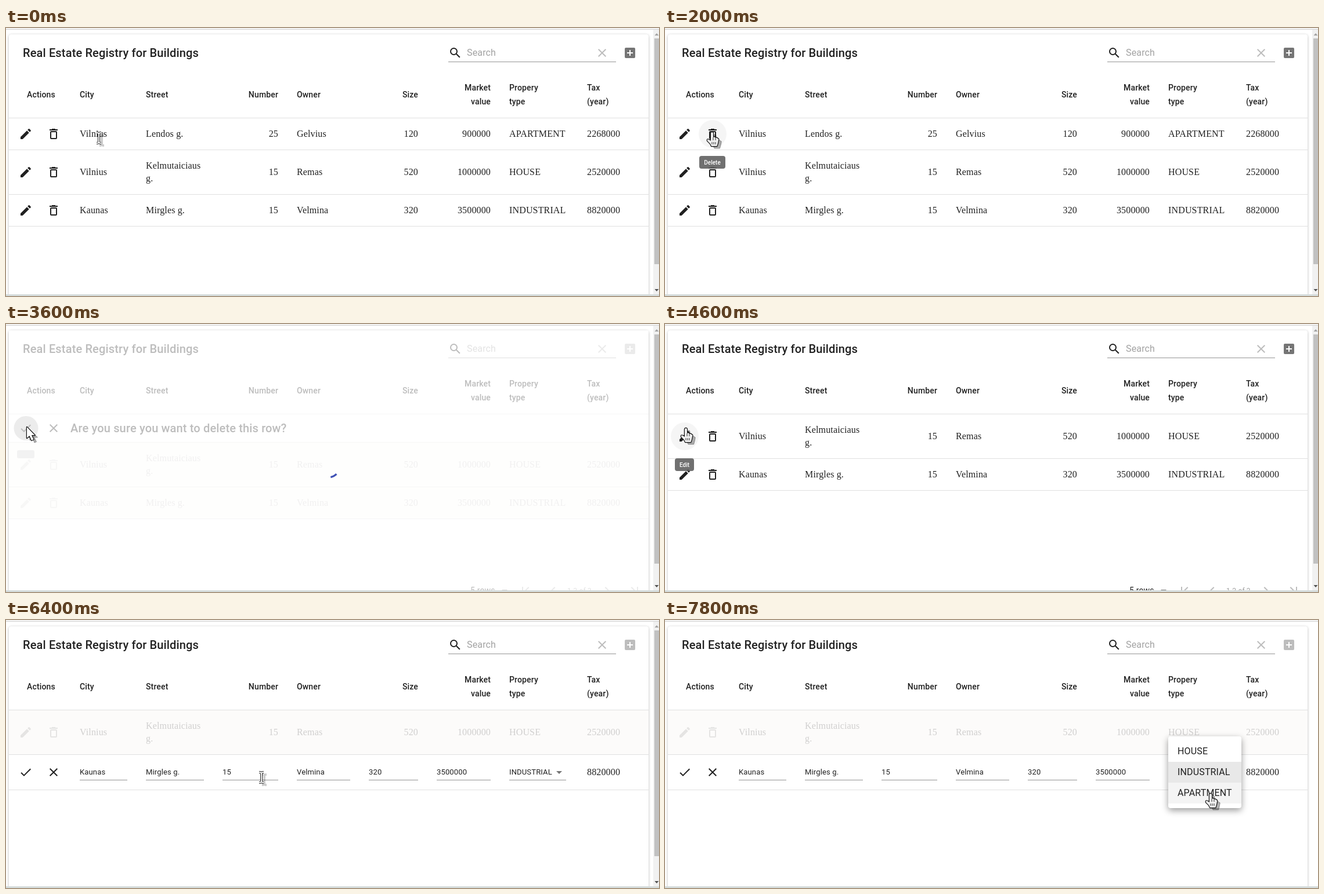
Animation of 1125 by 463 pixels, one loop 8 s. Source, as an HTML page with a canvas:

```html
<!DOCTYPE html>
<html lang="en">
<head>
<meta charset="utf-8">
<title>Building registry</title>
<style>
html, body { margin: 0; width: 100%; height: 100%; overflow: hidden; background: #fff; }
canvas { display: block; }
</style>
</head>
<body>
<canvas id="stage" width="1125" height="463"></canvas>
<script>
const ctx = document.getElementById('stage').getContext('2d');
const LOOP = 8000, TICK = 200;
const INK = '#212121', LINE = '#e0e0e0', MUTED = '#757575', OFF = '#bdbdbd';
const COLS = [127, 241, 469, 501, 710, 835, 867, 1001];
const RIGHT = [2, 4, 5];
const ROWS = [
  ['Vilnius', 'Lendos g.', '25', 'Gelvius', '120', '900000', 'APARTMENT', '2268000'],
  ['Vilnius', 'Kelmutaiciaus|g.', '15', 'Remas', '520', '1000000', 'HOUSE', '2520000'],
  ['Kaunas', 'Mirgles g.', '15', 'Velmina', '320', '3500000', 'INDUSTRIAL', '8820000']
];
const HEADS = ['City', 'Street', 'Number', 'Owner', 'Size', 'Market|value', 'Propery|type', 'Tax|(year)'];
const FIELDS = [[127, 209], [241, 341], [373, 469], [501, 593], [625, 710], [742, 835], [867, 965]];

// time, scene, pointer, x, y, hovered button x and y, tooltip
const STEPS = [
  [0, 'three', 'beam', 160, 190],
  [800, 'three', 'beam', 136, 214],
  [1000, 'three', 'hand', 92, 242, 82, 249],
  [1200, 'three', 'hand', 82, 250, 82, 249, 'Delete'],
  [1800, 'three', 'hand', 82, 188, 82, 183],
  [2000, 'three', 'hand', 81, 180, 82, 183, 'Delete'],
  [2400, 'confirm', 'hand', 81, 180, 82, 180],
  [2600, 'confirm', 'beam', 156, 187, 82, 180, 'Cancel'],
  [2800, 'confirm', 'beam', 130, 188],
  [3000, 'confirm', 'hand', 76, 184, 82, 180],
  [3200, 'confirm', 'hand', 40, 180, 34, 180],
  [3400, 'confirm', 'hand', 36, 178, 34, 180, 'Save'],
  [3600, 'busy', 'arrow', 36, 178],
  [4400, 'two', 'hand', 36, 180, 34, 194],
  [4600, 'two', 'hand', 36, 180, 34, 194, 'Edit'],
  [4800, 'two', 'hand', 50, 206, 34, 194],
  [5000, 'two', 'hand', 42, 244, 34, 260],
  [5200, 'two', 'hand', 35, 260, 34, 260, 'Edit'],
  [6000, 'edit', 'hand', 35, 260, 34, 263],
  [6200, 'edit', 'beam', 150, 270],
  [6400, 'edit', 'beam', 440, 272],
  [6600, 'edit', 'beam', 760, 268],
  [6800, 'edit', 'hand', 938, 260],
  [7000, 'open', 'hand', 938, 260],
  [7200, 'menu', 'hand', 938, 260],
  [7400, 'menu', 'hand', 939, 266],
  [7600, 'menu', 'hand', 940, 286],
  [7800, 'menu', 'hand', 940, 300]
];

const POINTERS = {
  hand: new Path2D('M-2 10V2Q-2 0 0 0T2 2V9Q5 7 6 10Q9 9 9.500 11Q12 11 11 14L10 19L8.500 24H-1L-3 20L-8 15Q-9 11 -5 13L-2 15Z'),
  arrow: new Path2D('M0 0V19L4.500 15L8 23L11.500 21.500L8 14H13.500Z'),
  beam: new Path2D('M-4 -9Q0 -9 0 -7V7Q0 9 -4 9M4 -9Q0 -9 0 -7M4 9Q0 9 0 7')
};
const PENCIL = new Path2D('M3 17.250V21H6.750L17.810 9.940L14.060 6.190ZM15.130 5.120L18.880 8.870L20.710 7.040Q21.300 6.300 20.710 5.630L18.370 3.290Q17.600 2.700 16.960 3.290Z');

const roboto = (size, weight = 400) => `${weight} ${size}px Roboto, sans-serif`;
const SERIF = '16px "Liberation Serif", serif';

function text(s, x, y, font, color = INK, align = 'left', spacing = 0.15) {
  ctx.font = font;
  ctx.fillStyle = color;
  ctx.textAlign = align;
  ctx.letterSpacing = spacing + 'px';
  ctx.fillText(s, x, y);
}

function rect(x, y, w, h, color, radius = 0) {
  ctx.fillStyle = color;
  ctx.beginPath();
  ctx.roundRect(x, y, w, h, radius);
  ctx.fill();
}

function disc(x, y, r, color) {
  ctx.fillStyle = color;
  ctx.beginPath();
  ctx.arc(x, y, r, 0, Math.PI * 2);
  ctx.fill();
}

function raised(x, y, w, h, blur, drop, alpha) {
  ctx.save();
  ctx.shadowColor = `rgba(0,0,0,${alpha})`;
  ctx.shadowBlur = blur;
  ctx.shadowOffsetY = drop;
  rect(x, y, w, h, '#fff', 4);
  ctx.restore();
}

function stroke(width, ...lines) {
  ctx.lineWidth = width;
  ctx.beginPath();
  for (const [x, y, ...rest] of lines) {
    ctx.moveTo(x, y);
    for (let i = 0; i < rest.length; i += 2) ctx.lineTo(rest[i], rest[i + 1]);
  }
  ctx.stroke();
}

const ICONS = {
  pencil() { ctx.fill(PENCIL); },
  trash() {
    ctx.fillRect(5, 4, 14, 2);
    ctx.fillRect(9, 3, 6, 1);
    ctx.lineWidth = 2;
    ctx.beginPath();
    ctx.roundRect(7, 8, 10, 12, 1);
    ctx.stroke();
  },
  check() { stroke(2, [4.1, 12.7, 9, 17.6, 20.3, 6.3]); },
  cross() { stroke(2, [5.7, 5.7, 18.3, 18.3], [18.3, 5.7, 5.7, 18.3]); },
  search() {
    ctx.lineWidth = 2;
    ctx.beginPath();
    ctx.arc(9.5, 9.5, 5.5, 0, Math.PI * 2);
    ctx.stroke();
    stroke(2.1, [13.8, 13.8, 19.8, 19.8]);
  },
  add() {
    ctx.beginPath();
    ctx.roundRect(3, 3, 18, 18, 2);
    ctx.fill();
    ctx.strokeStyle = '#fff';
    stroke(2, [12, 7, 12, 17], [7, 12, 17, 12]);
  },
  back() { stroke(2, [14.7, 6.7, 9.4, 12, 14.7, 17.3]); },
  first() { stroke(2, [7, 6, 7, 18], [17.7, 6.7, 12.4, 12, 17.7, 17.3]); }
};

function icon(name, x, y, color = INK, mirrored = false) {
  ctx.save();
  ctx.translate(x, y);
  if (mirrored) ctx.scale(-1, 1);
  ctx.translate(-12, -12);
  ctx.fillStyle = ctx.strokeStyle = color;
  ICONS[name]();
  ctx.restore();
}

function triangle(x, y, w, h, color) {
  ctx.fillStyle = color;
  ctx.beginPath();
  ctx.moveTo(x - w / 2, y);
  ctx.lineTo(x + w / 2, y);
  ctx.lineTo(x, y + h);
  ctx.fill();
}

const rule = y => rect(5, y, 1102, 1, LINE);

function cells(values, y, font, drop, gap) {
  values.forEach((value, i) => {
    const lines = value.split('|');
    lines.forEach((s, n) => text(s, COLS[i], y + drop + (n - (lines.length - 1) / 2) * gap,
      font, INK, RIGHT.includes(i) ? 'right' : 'left'));
  });
}

function row(index, top, height, y, disabled) {
  if (disabled) rect(5, top, 1102, height, '#fcfbfa');
  ctx.globalAlpha = disabled ? 0.1 : 1;
  icon('pencil', 34, y);
  icon('trash', 82, y);
  ctx.globalAlpha = disabled ? 0.2 : 1;
  cells(ROWS[index], y, SERIF, 5, 22);
  ctx.globalAlpha = 1;
  rule(top + height);
}

function header(disabled) {
  text('Real Estate Registry for Buildings', 29, 50, roboto(20, 500));
  icon('search', 774, 43);
  text('Search', 794, 48, roboto(16), '#a2a2a2');
  icon('cross', 1027, 43, OFF);
  rect(762, 58, 289, 1, '#949494');
  icon('add', 1075, 43, disabled ? OFF : MUTED);
  text('Actions', 36, 120, roboto(14, 500));
  cells(HEADS, 115, roboto(14, 500), 5, 24);
  rule(155);
}

function editRow(focused) {
  icon('check', 34, 263);
  icon('cross', 82, 263);
  FIELDS.forEach(([left, right], i) => {
    const active = focused && i === 6;
    text(ROWS[2][i], left, 267, roboto(13));
    rect(left, active ? 275 : 276, right - left, active ? 2 : 1, active ? INK : '#949494');
  });
  triangle(953, focused ? 265 : 261, 10, focused ? -5 : 5, MUTED);
  text(ROWS[2][7], 1001, 268, SERIF);
  rule(293);
}

function footer(count) {
  text('5 rows', 800, 465, roboto(14));
  triangle(859, 459, 10, 5, MUTED);
  icon('first', 895, 460, OFF);
  icon('back', 943, 460, OFF);
  text(`1-${count} of ${count}`, 967, 465, roboto(12), '#a0a0a0');
  icon('back', 1035, 460, OFF, true);
  icon('first', 1083, 460, OFF, true);
}

function tooltip(label, x, y) {
  ctx.font = roboto(10, 500);
  ctx.letterSpacing = '0px';
  const w = Math.round(ctx.measureText(label).width) + 16;
  rect(Math.round(x - 0.5 - w / 2), y - 11, w, 22, 'rgba(97,97,97,.9)', 4);
  text(label, x - 0.5, y + 3.5, roboto(10, 500), '#fff', 'center', 0);
}

function spinner(ms) {
  const p = (ms / 1400) % 1;
  const ease = v => v * v * (3 - 2 * v);
  const grow = ease(Math.min(1, p * 2));
  const shift = ease(Math.max(0, p * 2 - 1));
  const start = (15 * grow + 110 * shift) / 20.2;
  const end = Math.min(Math.PI * 2, start + (1 + 99 * grow) / 20.2);
  const turn = p * Math.PI * 2;
  ctx.strokeStyle = '#3f51b5';
  ctx.lineWidth = 3.3;
  ctx.beginPath();
  ctx.arc(556, 246.5, 18.4, turn + start, turn + end);
  ctx.stroke();
}

function menu(y) {
  raised(867, 201, 126, 124, 12, 4, 0.4);
  rect(867, 245, 126, 36, '#e8e8e8');
  if (y > 281) rect(867, 281, 126, 36, '#f4f4f4');
  ['HOUSE', 'INDUSTRIAL', 'APARTMENT'].forEach((s, i) => text(s, 883, 232 + i * 36, roboto(16)));
}

function pointer(kind, x, y) {
  const path = POINTERS[kind];
  const beam = kind === 'beam';
  const paint = (color, width, fill) => {
    ctx.strokeStyle = color;
    ctx.lineWidth = width;
    ctx.stroke(path);
    if (fill) { ctx.fillStyle = fill; ctx.fill(path); }
  };
  ctx.save();
  ctx.lineJoin = 'round';
  ctx.translate(x + 5, y + 4);
  ctx.globalAlpha = beam ? 0.2 : 0.3;
  paint('#000', beam ? 4 : 1, beam ? null : '#000');
  ctx.globalAlpha = 1;
  ctx.translate(-5, -4);
  if (beam) {
    paint('#222', 4);
    paint('#fff', 2);
  } else {
    paint('#111', 2.4, kind === 'hand' ? '#eee' : '#fff');
    if (kind === 'hand') {
      ctx.strokeStyle = '#333';
      stroke(1, [2, 9, 2, 14], [6, 10, 6, 14], [0, 17, 0, 21], [3, 17, 3, 21], [6, 17, 6, 21]);
    }
  }
  ctx.restore();
}

function scrollbar(bottom) {
  rect(1115, 3, 10, 457, '#f1f1f1');
  rect(1117, 18, 8, bottom - 18, '#c1c1c1');
  triangle(1121, 13, 7, -4, '#a3a3a3');
  triangle(1121, 451, 7, 4, '#505050');
}

function draw(t) {
  const [, scene, kind, x, y, hoverX, hoverY, tip] = STEPS.findLast(step => step[0] <= t);
  const confirming = scene === 'confirm' || scene === 'busy';
  const editing = ['edit', 'open', 'menu'].includes(scene);

  rect(0, 0, 1125, 463, '#fff');
  raised(5, 11, 1102, 471, 4, 1, 0.28);
  if (hoverX) disc(hoverX, hoverY, 24, 'rgba(0,0,0,.04)');
  if (scene === 'busy' && t < 3800) disc(34.5, 180, 21, 'rgba(0,0,0,.25)');
  header(confirming || editing);

  if (scene === 'three') {
    row(0, 155, 55, 183);
    row(1, 210, 77, 249);
    row(2, 287, 55, 315);
  } else if (confirming) {
    icon('check', 34, 180);
    icon('cross', 82, 180);
    text('Are you sure you want to delete this row?', 111, 187, roboto(20, 500));
    rule(204);
    row(1, 205, 76, 243, true);
    row(2, 282, 54, 309, true);
    footer(3);
  } else {
    row(1, 156, 76, 194, editing);
    if (editing) editRow(scene !== 'edit');
    else {
      row(2, 232, 55, 260);
      footer(2);
    }
  }

  if (scene === 'busy') {
    if (t < 3800) rect(19, 218, 30, 14, 'rgba(97,97,97,.25)', 3);
    rect(5, 11, 1102, 449, 'rgba(255,255,255,.7)');
    spinner(t - 3450);
  }
  if (scene === 'menu') menu(y);
  if (tip) tooltip(tip, hoverX, hoverY + 49);

  rect(0, 0, 1125, 2, '#f6f6f6');
  rect(0, 2, 1125, 1, '#d2d2d2');
  if (scene !== 'open' && scene !== 'menu') scrollbar(confirming || scene === 'two' ? 414 : 408);
  rect(0, 460, 1125, 3, '#d5dcdc');
  pointer(kind, x, y);
}

const began = performance.now();
function frame() {
  const t = (performance.now() - began) % LOOP;
  draw(Math.floor(t / TICK) * TICK);
  requestAnimationFrame(frame);
}
frame();
</script>
</body>
</html>
```
